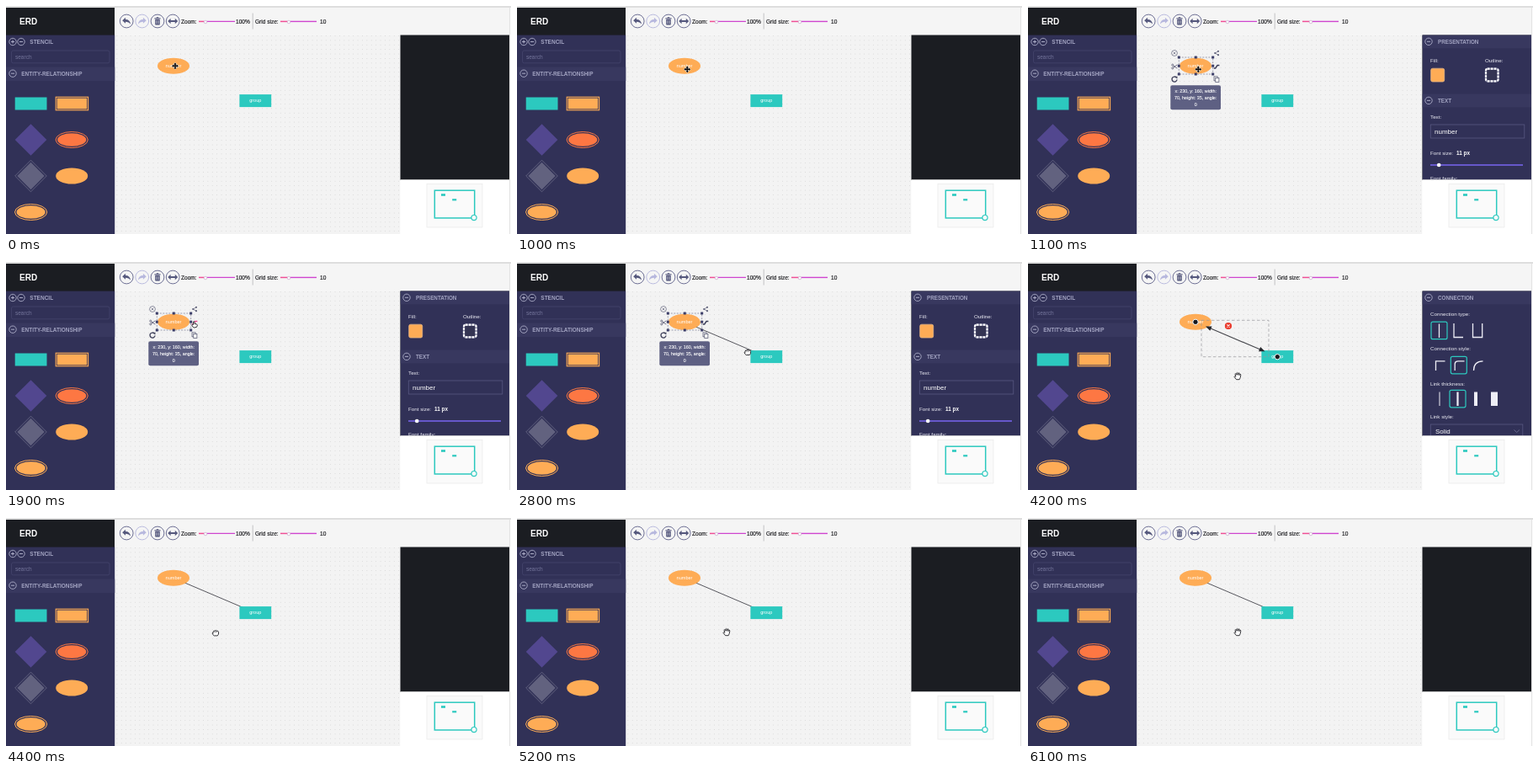
Recreate the animation shown at these times as an HTML page. Size 600 px wide and 271 px high, loop 6200 ms.

```html
<!DOCTYPE html>
<html lang="en">
<head>
<meta charset="utf-8">
<title>ERD editor</title>
<style>
html, body { margin: 0; width: 100%; height: 100%; overflow: hidden; background: #fff; }
svg { display: block; width: 100vw; height: 100vh; font-family: "Liberation Sans", Arial, sans-serif; }
</style>
</head>
<body>
<svg id="stage" viewBox="0 0 600 271"></svg>
<script>
const NAVY = '#313157', HEAD = '#38385f', DARK = '#1b1d22', TEAL = '#2cc9bf',
  ORANGE = '#feac56', RED = '#fd7743', MUTED = '#a3a4c2', INK = '#55587d', LINK = '#55555c';
const LOOP = 6200, STEP = 100;
const SELECT = 1100, DRAG = 2000, DROP = 3400, CLEAR = 4300, RELEASE = 5000;
const NUMBER = { x: 199, y: 71.3 }, GROUP = { x: 296.3, y: 112.7 };
const SNAP = 27;

const rect = (x, y, w, h, fill, extra = '') =>
  `<rect x="${x}" y="${y}" width="${w}" height="${h}" fill="${fill}" ${extra}/>`;
const circle = (x, y, r, fill, extra = '') =>
  `<circle cx="${x}" cy="${y}" r="${r}" fill="${fill}" ${extra}/>`;
const oval = (x, y, rx, ry, fill, extra = '') =>
  `<ellipse cx="${x}" cy="${y}" rx="${rx}" ry="${ry}" fill="${fill}" ${extra}/>`;
const path = (d, stroke, width = 1, extra = '') =>
  `<path d="${d}" fill="none" stroke="${stroke}" stroke-width="${width}" ${extra}/>`;
const solid = (d, fill, extra = '') => `<path d="${d}" fill="${fill}" ${extra}/>`;
const text = (s, x, y, size, fill, extra = '') =>
  `<text x="${x}" y="${y}" font-size="${size}" fill="${fill}" ${extra}>${s}</text>`;
const group = (body, attrs) => `<g ${attrs}>${body}</g>`;
const at = (x, y, body) => group(body, `transform="translate(${x} ${y})"`);
const outline = (color, width = 1) => `stroke="${color}" stroke-width="${width}"`;
const bold = 'font-weight="700"', mid = 'text-anchor="middle"';
const diamond = (r) => `M0 ${-r}L${r} 0L0 ${r}L${-r} 0Z`;

const toggle = (x, y, plus) =>
  circle(x, y, 4.2, 'none', outline('#b9bad3', .8)) +
  path(`M${x - 2} ${y}h4` + (plus ? `M${x} ${y - 2}v4` : ''), '#b9bad3', .9);

const doubleOval = (x, y, color) =>
  oval(x, y, 19.1, 9.5, 'none', outline(color, 1)) + oval(x, y, 17.1, 7.7, color);

function stencil() {
  return rect(0, 2, 129.2, 33, DARK) + text('ERD', 16, 21.7, 10, '#fff', bold) +
    rect(0, 34.6, 129.2, 237, NAVY) +
    toggle(8, 42.5, true) + toggle(18, 42.5) + text('STENCIL', 28.3, 44.9, 6.5, MUTED, bold) +
    rect(6.5, 53, 116.5, 14.8, 'none', 'rx="2" ' + outline('#45456c', .8)) +
    text('search', 11, 62.7, 6.5, '#74759b') +
    rect(0, 72.5, 129.2, 16.5, HEAD) + toggle(8, 80.2) +
    text('ENTITY-RELATIONSHIP', 18.3, 82.6, 6.45, MUTED, bold) +
    rect(10.7, 108.5, 37.8, 15, TEAL) +
    rect(59.2, 108.2, 38.4, 15.6, 'none', outline(ORANGE, 1.1)) + rect(60.6, 109.6, 35.6, 12.8, ORANGE) +
    at(29.5, 159, solid(diamond(18.8), '#52478f')) +
    doubleOval(78.2, 159, RED) +
    at(29.5, 202, path(diamond(18.8), '#6b6b87', .8) + solid(diamond(16.2), '#62627f')) +
    oval(78.2, 202, 19, 9.6, ORANGE) +
    doubleOval(29.6, 245, ORANGE);
}

const curvedArrow = 'M-5-.8L-1.2-4.2V-2Q4.2-2 4.8 3.6Q2.8.7-1.2.7V2.8Z';
const trash = rect(-2.8, -2.2, 5.6, 6.6, INK, 'rx=".7"') + rect(-3.6, -3.7, 7.2, 1.1, INK) +
  rect(-1.3, -4.8, 2.6, 1.2, INK) + path('M-1.1-.9v4M1.1-.9v4', '#f4f4f4', .6);

function slider(x, knob) {
  return path(`M${x} 18.4H${knob - 1.5}`, '#ef4f96', 1.5) +
    path(`M${knob + 1.5} 18.4H${x + 43}`, '#cf45cf', 1.4) +
    circle(knob, 19, 1.8, '#fff', outline('#c39bc4', .6));
}

function toolbar() {
  const icons = [solid(curvedArrow, INK),
    solid(curvedArrow, '#b7b8de', 'transform="scale(-1 1)"'),
    trash, solid('M-6 0l3.4-3.2v2.1h5.2v-2.1L6 0 2.6 3.2V1.1h-5.2v2.1z', INK)];
  const label = (s, x) => text(s, x, 20.7, 6.55, '#18181c', outline('#18181c', .15));
  return rect(129.2, 2, 468.8, 32.6, '#f5f5f5') +
    icons.map((body, i) => at([143.2, 161.7, 180, 198.2][i], 18,
      circle(0, 0, 7.9, 'none', outline(i === 1 ? '#babbdf' : '#6d6f94', 1)) + body)).join('') +
    label('Zoom:', 208) + slider(229, 237) + label('100%', 273) +
    path('M293.2 8.5V27.5', '#b5b5b9', .8) +
    label('Grid size:', 296) + slider(326, 336) + label('10', 373);
}

function minimap() {
  return rect(468.5, 206.3, 129.5, 65, '#fff') +
    rect(500, 211.5, 66, 51.5, '#fafafa', outline('#e8e8e8', .7)) +
    rect(509.3, 219.2, 47.4, 32.8, 'none', outline(TEAL, 1.5)) +
    rect(517, 223.2, 5, 2.6, TEAL) + rect(530.2, 229.2, 5, 2.2, TEAL) +
    circle(556, 251.6, 3.1, '#fafafa', outline(TEAL, 1.2));
}

const white = '#eeeef6';
const section = (name, y) => rect(468.5, y, 129.5, 15.8, HEAD) + toggle(476, y + 7.8) +
  text(name, 487, y + 10.2, 6.3, MUTED, bold);
const caption = (s, x, y) => text(s, x, y, 6.25, white);
const sideBack = (color) => rect(468.5, 34.5, 129.5, 172.5, color);

function shapePanel() {
  return sideBack(NAVY) + section('PRESENTATION', 34.5) +
    caption('Fill:', 478, 66.8) + caption('Outline:', 543, 66.8) +
    rect(478.7, 74.2, 16, 15.8, ORANGE, 'rx="2" ' + outline('#e6b586', .8)) +
    rect(544, 74.7, 14.6, 14.6, '#343453', 'rx="2" ' + outline('#8b8ba6', 2.2)) +
    rect(544, 74.7, 14.6, 14.6, 'none', 'rx="2" stroke-dasharray="2.5 1.4" ' + outline('#fff', 2.2)) +
    section('TEXT', 104.6) + caption('Text:', 478, 134) +
    rect(478.3, 141, 111.5, 16, 'none', outline('#585880', .8)) +
    text('number', 483, 152, 8, '#fff') +
    caption('Font size:', 478, 177) + text('11 px', 509, 177, 6.4, '#fff', bold) +
    path('M478 189H588', '#7966f0', 1.7) + circle(488.2, 189, 2.3, '#fff') +
    caption('Font family:', 478, 207.3);
}

function linkPanel() {
  const chosen = (x, y) => rect(x, y, 19, 20.5, 'none', 'rx="2" ' + outline(TEAL, 1.2));
  const bars = [[489, 1], [510.5, 2.2], [532, 4], [554, 8]];
  return sideBack(NAVY) + section('CONNECTION', 34.5) +
    caption('Connection type:', 478, 64.3) + chosen(479, 71.2) +
    path('M488.5 73.5V90M506 73V89.5H517M528.5 73V89.5H539.7V73', white, 1.3) +
    caption('Connection style:', 478, 105.3) + chosen(502.3, 112.3) +
    path('M484.5 129V117.8H495.5M507.2 129V121.5Q507.2 117.8 511 117.8H518.5M529.5 129Q529.5 117.8 540.5 117.8', white, 1.3) +
    caption('Link thickness:', 478, 147) + chosen(501, 152.3) +
    bars.map(([x, w]) => path(`M${x} 154.5V171`, white, w)).join('') +
    caption('Link style:', 478, 186) +
    rect(478.3, 193, 109.5, 18, 'none', outline('#585880', .8)) +
    text('Solid', 484, 204.3, 8, '#fff') + path('M577.5 199.5l3.2 3 3.2-3', '#77789b', .8);
}

function halo() {
  const xs = [179.3, 199.3, 219.7], ys = [61, 71.2, 81];
  let grips = '';
  for (const x of xs) for (const y of ys)
    if (x !== xs[1] || y !== ys[1]) grips += rect(x - 1.5, y - 1.5, 3, 3, '#3b3d68');
  const icon = '#62647c';
  const tip = ['x: 230, y: 160, width:', '70, height: 35, angle:', '0'];
  return rect(179.3, 61, 40.4, 20, 'none', 'stroke-dasharray="2 1.5" ' + outline('#777990', .7)) + grips +
    at(174, 56, circle(0, 0, 3.4, '#f3f3f3', outline(icon, .7)) + path('M-1.3-1.3l2.6 2.6m0-2.6l-2.6 2.6', icon, .7)) +
    at(224, 56, path('M2-2.2L-1.8 0L2 2.2', icon, .7) + circle(2, -2.2, 1.1, icon) + circle(-1.8, 0, 1.1, icon) + circle(2, 2.2, 1.1, icon)) +
    at(174, 72, path('M-1.5-1.2L3.3 2.2M-1.5 1.2L3.3-2.2', icon, .9) + circle(-2.2, -1.9, 1.1, 'none', outline(icon, .8)) + circle(-2.2, 1.9, 1.1, 'none', outline(icon, .8))) +
    at(224, 72, `<path id="linkTool" d="M-3.2 2H-1.3L1-1.5H3.4" fill="none" stroke-width="1.4"/>`) +
    at(174, 87, path('M2.1-2.1A3 3 0 1 0 3 .5', '#44465f', 1.4) + solid('M.6-3.3L3.6-3.2 3.2-.2Z', '#44465f')) +
    at(224, 87, rect(-3, -3.2, 4.2, 5, '#f3f3f3', outline(icon, .8)) + rect(-1.3, -1.6, 4.2, 5, '#f3f3f3', outline(icon, .8))) +
    rect(169.3, 94.2, 59.7, 29, '#5e6083', 'rx="2"') +
    tip.map((s, i) => text(s, 199.2, 103.3 + i * 7.7, 5.4, '#fff', mid + ' ' + outline('#fff', .12))).join('');
}

function linkTools() {
  const angle = Math.atan2(GROUP.y - NUMBER.y, GROUP.x - NUMBER.x) * 180 / Math.PI;
  const tip = (x, y, a) => group(solid('M0 0L-7-2.8V2.8Z', '#25262c'), `transform="translate(${x} ${y}) rotate(${a})"`);
  const anchor = (p) => circle(p.x, p.y, 3.2, '#17181d', outline('#fff', 1));
  return path('M213 77.3L279.5 105.5', '#46474d', 1.1) +
    rect(206, 69.3, 80, 43.4, 'none', 'stroke-dasharray="3.5 2.5" ' + outline('#97979c', .7)) +
    tip(211, 76.4, angle + 180) + tip(281.5, 106.3, angle) + anchor(NUMBER) + anchor(GROUP) +
    at(238, 76, circle(0, 0, 4.1, '#ea3a2c') + path('M-1.6-1.6l3.2 3.2m0-3.2l-3.2 3.2', '#fff', 1.1));
}

const edge = 'stroke="#fff" stroke-width="1" paint-order="stroke" transform="scale(.9)"';
const hand = 'fill="#fff" stroke="#202024" stroke-width=".9" stroke-linejoin="round"';
const cursors = {
  move: solid('M0-4.4L1.9-2.1H.8V-.8H2.1V-1.9L4.4 0 2.1 1.9V.8H.8V2.1H1.9L0 4.4-1.9 2.1H-.8V.8H-2.1V1.9L-4.4 0-2.1-1.9V-.8H-.8V-2.1H-1.9Z', '#0c0c0e', edge),
  point: `<path ${hand} d="M-1.5 .5V-3Q-.8-4.2 0-3V-.5Q3.2-.8 3.4 1.2Q3.5 4-.2 4Q-2 4-3.3 1Q-3-.2-1.5 .5Z"/>`,
  closed: `<path ${hand} d="M-2.9-1Q-2.7-3-1.1-2.5Q0-3.6 1-2.5Q3.5-3 3.6-.8Q3.9 1.8 2.3 3.2H-1.7Q-3.6 2-3.8 .4Q-3.7-.7-2.9-1Z"/>` +
    path('M-1-2.2V-.4M.9-2.2V-.4M-2.7-.8V.6', '#202024', .6),
  open: `<path ${hand} d="M-2.1-.5L-2.9-3.4Q-2.3-4.8-1.5-3.7L-1.1-2.5-1.2-4.6Q-.4-6 .3-4.6L.5-2.5 1-4.6Q2-5.5 2.3-4.1L2.1-2.1 2.9-3.3Q3.9-3.6 3.8-2.3Q3.3 1.6 2.2 3H-1.4Q-2.8 1.3-4-.4Q-3.7-1.6-2.1-.5Z"/>`
};

const stage = document.getElementById('stage');
stage.innerHTML =
  `<defs><pattern id="grid" x="180" y="62" width="5.4" height="5.4" patternUnits="userSpaceOnUse">
    <rect width=".8" height=".8" fill="#cfcfcf"/></pattern>
    <clipPath id="side"><rect x="468.5" y="34.5" width="129.5" height="172"/></clipPath></defs>` +
  rect(0, 0, 600, 271, '#fff') + path('M0 1H600', '#bdbdbd', 1) +
  rect(129.2, 34.5, 339.3, 237, '#f3f3f3') + rect(129.2, 34.5, 339.3, 237, 'url(#grid)') +
  `<line id="link" x1="${NUMBER.x}" y1="${NUMBER.y}" stroke="${LINK}" stroke-width="1"/>` +
  oval(NUMBER.x, NUMBER.y, 19, 9.5, ORANGE) + text('number', NUMBER.x, 73.1, 5.6, '#fff', mid) +
  rect(277.4, 105.1, 37.8, 15, TEAL) + text('group', GROUP.x, 114.2, 5.6, '#fff', mid) +
  group(halo(), 'id="halo"') + group(linkTools(), 'id="linkTools"') +
  stencil() + toolbar() + sideBack(DARK) +
  group(group(shapePanel(), 'id="shapePanel"') + group(linkPanel(), 'id="linkPanel"'), 'clip-path="url(#side)"') +
  minimap() + path('M598.6 2V271', '#d9d9d9', .8) +
  Object.keys(cursors).map((k) => group(cursors[k], `id="${k}"`)).join('');

const $ = (id) => document.getElementById(id);
const show = (id, on) => $(id).setAttribute('display', on ? 'inline' : 'none');

// time, x, y
const track = [
  [0, 201, 71.3], [500, 201, 71.3], [800, 202.3, 75.3], [SELECT, 202.3, 75.3],
  [1800, 224, 74], [DRAG, 224, 74], [2800, 274, 107.3], [3200, 280.3, 115.7],
  [DROP, 280.3, 115.7], [4200, 249, 136.7], [LOOP, 249, 136.7]
];

function cursorAt(t) {
  const i = track.findIndex((key, n) => n > 0 && t <= key[0]);
  const [t0, x0, y0] = track[i - 1], [t1, x1, y1] = track[i];
  const u = (t - t0) / (t1 - t0), k = u * u * (3 - 2 * u);
  return { x: x0 + (x1 - x0) * k, y: y0 + (y1 - y0) * k };
}

function cursorKind(t, x) {
  if (t < DRAG) return x > 218 ? 'point' : 'move';
  if (t < DROP) return 'closed';
  if (t < CLEAR) return x > 277 ? 'move' : 'open';
  return t < RELEASE ? 'closed' : 'open';
}

function draw(time) {
  const t = Math.floor(time % LOOP / STEP) * STEP;
  const p = cursorAt(t), kind = cursorKind(t, p.x);
  const shapeOn = t >= SELECT && t < DROP, linkOn = t >= DROP && t < CLEAR;
  // The loose end snaps to the group once the pointer is close.
  const near = Math.hypot(p.x - GROUP.x, p.y - GROUP.y) < SNAP;
  const end = t >= DROP || near ? GROUP : p;
  $('link').setAttribute('x2', end.x);
  $('link').setAttribute('y2', end.y);
  show('link', t >= DRAG && !linkOn);
  show('halo', shapeOn);
  show('shapePanel', shapeOn);
  show('linkTools', linkOn);
  show('linkPanel', linkOn);
  $('linkTool').setAttribute('stroke', kind === 'point' ? '#ed4a93' : '#3b3d58');
  for (const k in cursors) show(k, k === kind);
  $(kind).setAttribute('transform', `translate(${p.x} ${p.y})`);
}

const start = performance.now();
function tick() {
  draw(performance.now() - start);
  requestAnimationFrame(tick);
}
tick();
</script>
</body>
</html>
```
